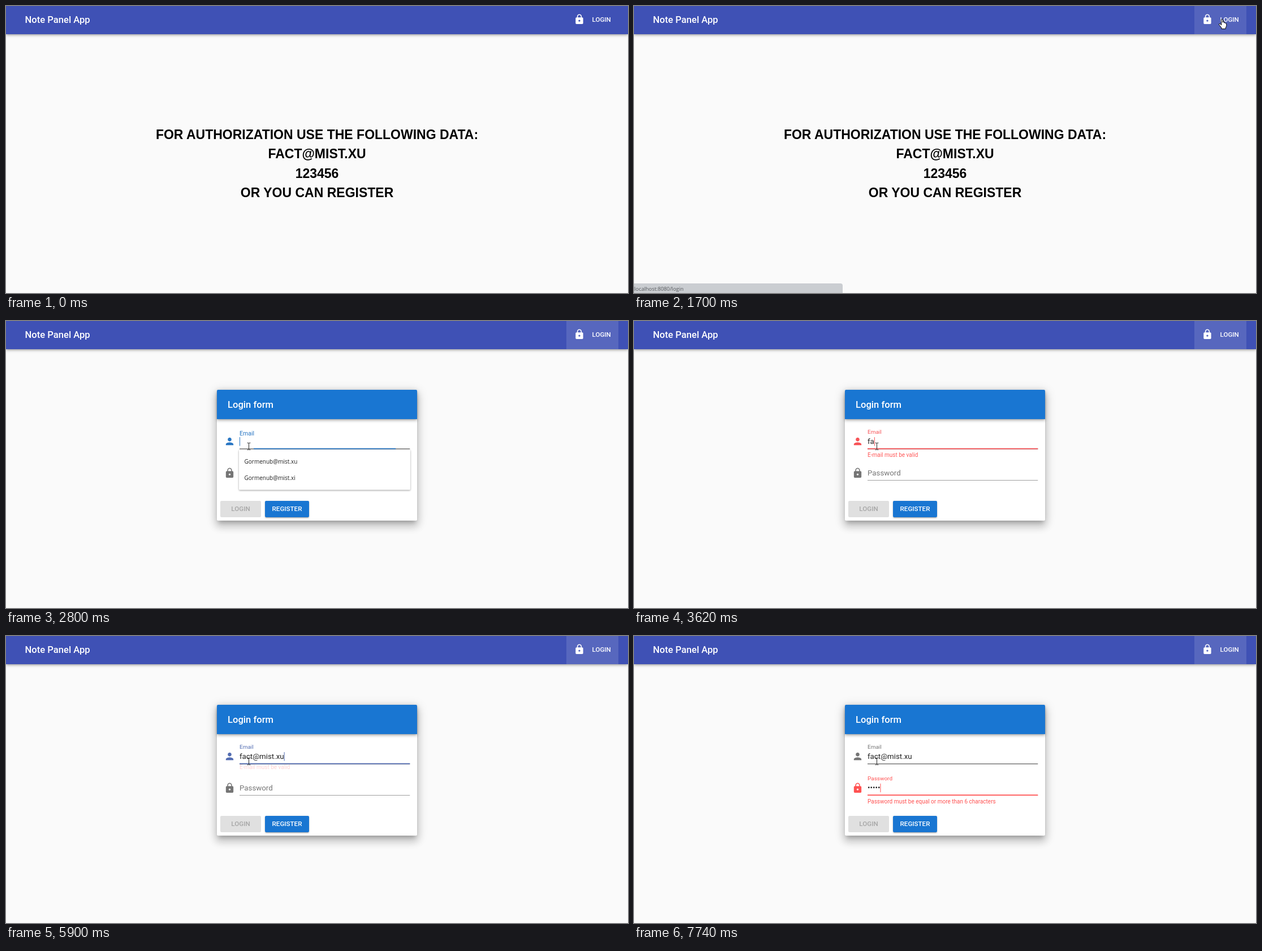
An HTML page that plays this animation: 1100x509 px, repeating every 8000 ms.

```html
<!DOCTYPE html>
<html lang="en">
<head>
<meta charset="utf-8">
<title>Login form</title>
<style>
  html, body { margin: 0; width: 100%; height: 100%; overflow: hidden; background: #fafafa; }
  div, svg { position: absolute; }
  svg { left: 0; top: 0; font-family: Roboto, sans-serif; }
  text { white-space: pre; }
  .bar, .head { box-shadow: 0 1.7px 3.3px -.8px rgba(0,0,0,.2), 0 3.3px 4.2px rgba(0,0,0,.14), 0 .8px 8px rgba(0,0,0,.12); }
  .bar { left: 0; top: 0; width: 1100px; height: 50px; background: #3f51b5; }
  #tint { left: 991px; top: 0; width: 92px; height: 50px; background: #fff; }
  #card { left: 373px; top: 122px; width: 354px; height: 232px; background: #fff; border-radius: 2px;
    box-shadow: 0 5.8px 6.7px -3.3px rgba(0,0,0,.2), 0 10px 14px 1.7px rgba(0,0,0,.14), 0 4px 18px 3.3px rgba(0,0,0,.12); }
  .head { left: 0; top: 0; width: 354px; height: 52px; background: #1976d2; border-radius: 2px 2px 0 0; }
  .btn { top: 196.5px; height: 29.5px; border-radius: 2px; }
  .off { left: 6px; width: 72px; background: #e0e0e0; }
  .on { left: 85px; width: 78px; background: #1976d2;
    box-shadow: 0 2.5px 1px -1.7px rgba(0,0,0,.2), 0 1.7px 1.7px rgba(0,0,0,.14), 0 .8px 4px rgba(0,0,0,.12); }
  .title { font-size: 16.6px; font-weight: 500; fill: #fff; }
  .label { font-size: 11.6px; font-weight: 500; fill: #fff; }
  .notice { font: bold 23px "Liberation Sans", Arial, sans-serif; text-anchor: middle; }
  .system { font-family: "Open Sans", sans-serif; }
  .input { font-size: 13.3px; }
  .menu { filter: drop-shadow(0 1px 1.5px rgba(0,0,0,.4)); }
</style>
</head>
<body>
<div class="bar"></div>
<div id="tint"></div>
<div id="card">
  <div class="head"></div>
  <div class="btn off"></div>
  <div class="btn on"></div>
</div>
<svg id="stage" width="1100" height="509" viewBox="0 0 1100 509"></svg>
<script>
const LOOP = 8000, BLUE = [25, 118, 210], RED = [255, 82, 82], GRAY = [117, 117, 117];
const LEFT = 413, RIGHT = 714.3, MIDDLE = (LEFT + RIGHT) / 2;
const EMAIL = 'fact@mist.xu';
const PERSON = 'M12 12c2.21 0 4-1.79 4-4s-1.79-4-4-4-4 1.79-4 4 1.79 4 4 4zm0 2c-2.67 0-8 1.34-8 4v2h16v-2c0-2.66-5.33-4-8-4z';
const LOCK = 'M18 8h-1V6c0-2.76-2.24-5-5-5S7 3.24 7 6v2H6c-1.1 0-2 .9-2 2v10c0 1.1.9 2 2 2h12c1.1 0 2-.9 2-2V10c0-1.1-.9-2-2-2zm-6 9c-1.1 0-2-.9-2-2s.9-2 2-2 2 .9 2 2-.9 2-2 2zm3.1-9H8.9V6c0-1.71 1.39-3.1 3.1-3.1 1.71 0 3.1 1.39 3.1 3.1v2z';

const fields = [
  { name: 'Email', icon: PERSON, iconY: 203.5, y: 0, value: EMAIL, focus: 2666, blur: 6165,
    keys: [3420, 3610, 3850, 4090, 4240, 4700, 4820, 4940, 5060, 5340, 5670, 5790],
    colors: [[2666, BLUE], [3420, RED], [5790, BLUE], [6165, GRAY]],
    error: 'E-mail must be valid', errorFrom: 3420, errorTo: 5790 },
  { name: 'Password', icon: LOCK, iconY: 259.6, y: 55.7, value: '•••••', focus: 6165, blur: Infinity,
    keys: [6510, 6800, 7100, 7510, 7740],
    colors: [[6165, BLUE], [6510, RED]],
    error: 'Password must be equal or more than 6 characters', errorFrom: 6510, errorTo: Infinity }
];

// time, x, y of the pointer's hot spot
const pointerPath = [[210, 905, 509], [450, 967, 250], [750, 1026, 39], [800, 1049, 17], [850, 1040, 23],
  [1930, 1040, 23], [2440, 455, 317], [2520, 455, 317], [2666, 429.5, 222]];

const icon = (path, x, y) => `<path class="icon" d="${path}" transform="translate(${x} ${y}) scale(.833)"/>`;
const text = (cls, x, y, content, extra = '') => `<text class="${cls}" x="${x}" y="${y}" ${extra}>${content}</text>`;

const fieldMarkup = f => `<g class="field">${icon(f.icon, 385.5, f.iconY)}
  <g transform="translate(0 ${f.y})">
    <rect class="line" x="${LEFT}" y="226.4" width="${RIGHT - LEFT}" height=".9"/>
    <rect class="active" y="225.6" height="1.8"/>
    <text class="name">${f.name}</text>
    ${text('input', LEFT, 217.8, '', 'fill="#212121"')}
    ${text('error', LEFT, 241.6, f.error, 'font-size="10" fill="#ff5252"')}
    <rect class="caret" y="206" width="1" height="15.5"/>
  </g></g>`;

const $ = selector => document.querySelector(selector);
$('#stage').innerHTML = `
  ${text('title', 33.5, 29.6, 'Note Panel App')}
  <g fill="#fff">${icon(LOCK, 1004, 13.6)}</g>
  ${text('label', 1036.5, 28, 'LOGIN')}
  <g id="notice">${['FOR AUTHORIZATION USE THE FOLLOWING DATA:', EMAIL.toUpperCase(), '123456', 'OR YOU CAN REGISTER']
    .map((row, i) => text('notice', 550, 235.8 + i * 34.35, row)).join('')}</g>
  <g id="form">
    ${text('title', 392, 153.8, 'Login form')}
    ${fields.map(fieldMarkup).join('')}
    ${text('label', 415, 337.3, 'LOGIN', 'text-anchor="middle" style="fill:#a6a6a6"')}
    ${text('label', 497, 337.3, 'REGISTER', 'text-anchor="middle"')}
  </g>
  <g id="menu"><rect class="menu" x="412" y="228.2" width="303" height="71.3" rx="1.5" fill="#fff"/>
    ${['xu', 'xi'].map((end, i) => text('system', 421.5, 252.8 + i * 29.6, 'Gormenub@mist.' + end, 'font-size="10" fill="#222"')).join('')}</g>
  <g id="status"><path d="M0 492H365q4 0 4 4V509H0z" fill="#cacdd1"/>
    ${text('system', .5, 505, 'localhost:8080/login', 'font-size="9.3" fill="#55585c"')}</g>
  <g id="pointer" stroke-linejoin="round">
    <path id="arrow" d="M0 0V14.5L3.4 11.3L5.6 16.5L7.9 15.5L5.7 10.5H10.3Z" fill="#fff" stroke="#000" stroke-width=".9"/>
    <path id="hand" d="M-1.3 1Q0-.6 1.2 1V6.2Q3-.0 3.6 6.8Q5.4 6 6 7.7Q7.5 7.2 7.8 9V12.5L6.3 15.4V17.5H-1V15.6L-5.4 10.2Q-5.8 8-3.6 8.6L-1.3 10.8Z" fill="#fff" stroke="#000"/>
    <path id="beam" d="M-2.8-5.8H-.7L0-5L.7-5.8H2.8M0-5V5.6M-2.8 6.4H-.7L0 5.6L.7 6.4H2.8" fill="none" stroke="#222"/>
  </g>`;

const parts = [...document.querySelectorAll('.field')].map(g => Object.fromEntries(
  ['icon', 'line', 'active', 'name', 'input', 'error', 'caret'].map(c => [c, g.querySelector('.' + c)])));

const clamp = v => Math.max(0, Math.min(1, v));
const mix = (a, b, k) => a + (b - a) * k;
const ease = (t, start) => 1 - (1 - clamp((t - start) / 300)) ** 3;
const show = (el, on) => { el.style.visibility = on ? 'visible' : 'hidden'; };
const set = (el, attrs) => { for (const k in attrs) el.setAttribute(k, attrs[k]); };

function colorAt(stops, t) {
  const rgb = stops.reduce((c, [start, next]) => c.map((v, i) => mix(v, next[i], ease(t, start))), GRAY);
  return `rgb(${rgb.map(Math.round)})`;
}

function drawField(f, el, t) {
  const color = colorAt(f.colors, t);
  const floating = ease(t, f.focus);
  const half = (RIGHT - LEFT) / 2 * floating * (1 - ease(t, f.blur));
  const typed = f.keys.filter(k => k <= t);
  const lastInput = Math.max(f.focus, ...typed);
  const hovered = f.name === 'Email' && t >= 2640;
  const message = ease(t, f.errorFrom) * (1 - ease(t, f.errorTo));

  set(el.icon, { fill: color });
  set(el.line, { fill: hovered ? '#212121' : '#949494' });
  set(el.active, { x: MIDDLE - half, width: half * 2, fill: color });
  set(el.name, { fill: color, 'font-size': 13.3,
    transform: `translate(${LEFT} ${mix(217.8, 199.8, floating)}) scale(${mix(1, .75, floating)})` });
  el.input.textContent = f.value.slice(0, typed.length);
  set(el.error, { opacity: message, transform: `translate(0 ${-7 * (1 - message)})` });
  set(el.caret, { fill: color, x: LEFT + (typed.length ? el.input.getComputedTextLength() : 0) });
  show(el.caret, t >= f.focus && t < f.blur && (t - lastInput) % 1000 < 500);
}

function drawPointer(t) {
  const next = pointerPath.findIndex(p => p[0] > t);
  const b = pointerPath.at(next), a = next > 0 ? pointerPath[next - 1] : b;
  let k = a === b ? 0 : (t - a[0]) / (b[0] - a[0]);
  if (a[0] === 1930) k = k * k * (3 - 2 * k);
  const x = mix(a[1], b[1], k), y = mix(a[2], b[2], k);
  const visible = t >= 210, onButton = x >= 991 && x < 1083 && y < 50;
  const kind = onButton ? 'hand' : t > 2600 ? 'beam' : 'arrow';
  set($('#pointer'), { transform: `translate(${x} ${y})` });
  for (const id of ['arrow', 'hand', 'beam']) show($('#' + id), visible && id === kind);
  return onButton;
}

function draw(t) {
  const loggedPage = t >= 1760;
  const onButton = drawPointer(t);
  $('#tint').style.opacity = t < 1700 ? (onButton ? .11 : 0) : onButton ? mix(.11, .26, ease(t, 1700)) : .125;
  show($('#notice'), !loggedPage);
  show($('#form'), loggedPage);
  show($('#card'), loggedPage);
  show($('#status'), t >= 830 && t < 2150);
  show($('#menu'), t >= 2720 && t < 3420);
  fields.forEach((f, i) => {
    drawField(f, parts[i], t);
    if (!loggedPage) show(parts[i].caret, false);
  });
}

const begin = performance.now();
function tick() {
  draw((performance.now() - begin) % LOOP);
  requestAnimationFrame(tick);
}
tick();
</script>
</body>
</html>
```
